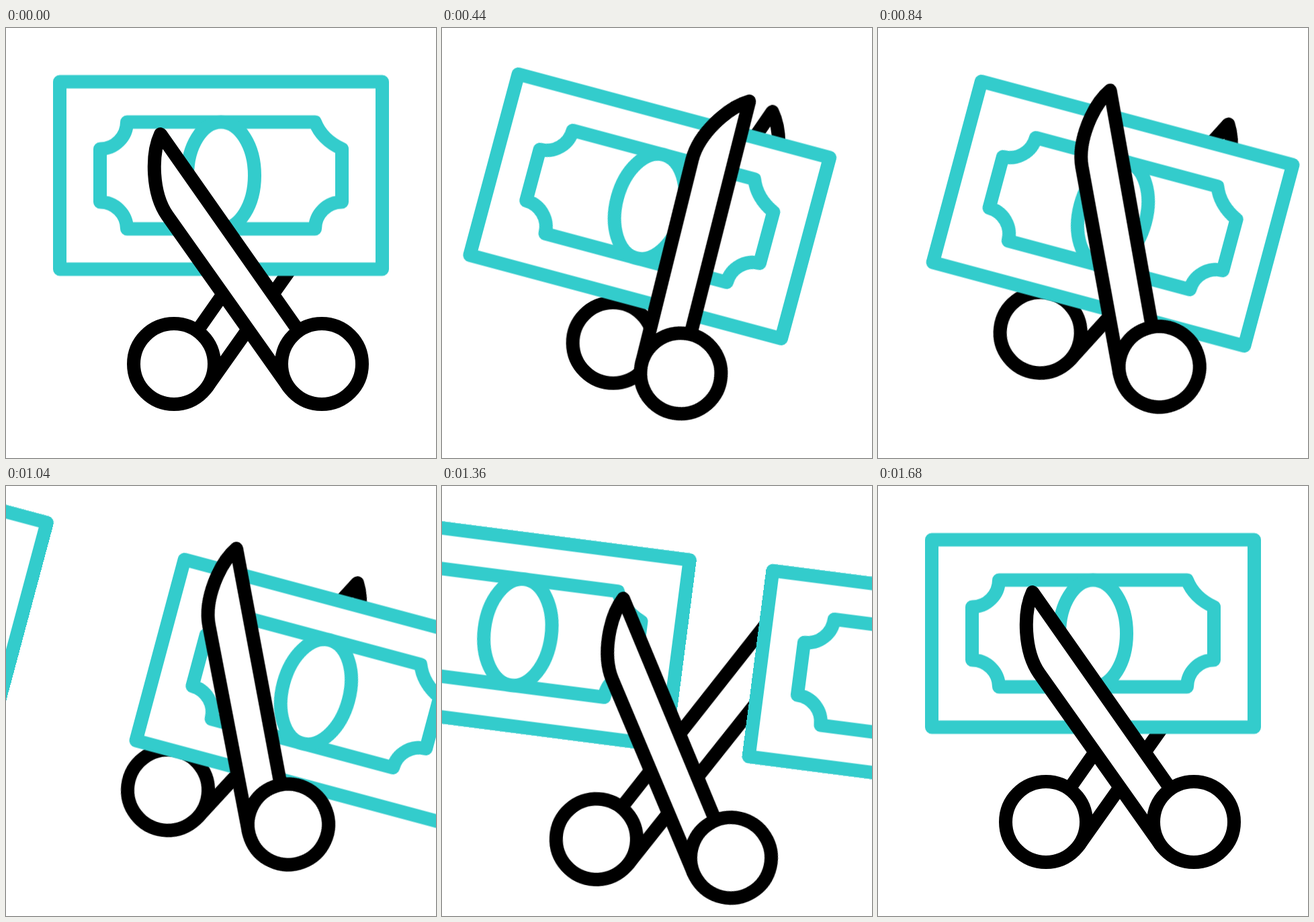
Recreate the animation shown at these times as an HTML page without scripts. Size 640 by 640 pixels, loop 2 s.

```html
<!DOCTYPE html>
<html lang="en">
<head>
<meta charset="utf-8">
<title>Scissors cutting banknotes</title>
<style>
  html, body { margin: 0; width: 100%; height: 100%; overflow: hidden; background: #fff; }
  svg { display: block; width: 100%; height: 100%; }
  .note, .arm { fill: #fff; stroke-width: 20; stroke-linejoin: round; stroke-linecap: round; }
  .note { stroke: #3cc; }
  .arm { stroke: #000; }

  .tilt, .lift, .front, .back, .leave, .enter { animation: 2s linear infinite; }
  .tilt { animation-name: tilt; }
  .lift { animation-name: lift; }
  .front { animation-name: front; }
  .back { animation-name: back; }
  .leave { animation-name: leave; }
  .enter { animation-name: enter; }

  /* Easing: (.333,0,.667,1) is a full ease; ending or starting at .5 gives its first or second half. */

  /* The whole scene leans over for the cut and straightens afterwards. */
  @keyframes tilt {
    0%, 76%, 100% { transform: translate(320px, 219.5px) rotate(0deg); }
    6% { transform: translate(320px, 219.5px) rotate(0deg); animation-timing-function: cubic-bezier(.333, 0, .667, .5); }
    14%, 68% { transform: translate(307px, 243px) rotate(7.43deg); animation-timing-function: cubic-bezier(.333, .5, .667, 1); }
    22% { transform: translate(309.25px, 265.5px) rotate(15deg); }
    60% { transform: translate(309.25px, 265.5px) rotate(15deg); animation-timing-function: cubic-bezier(.333, 0, .667, .5); }
  }
  @keyframes lift {
    0%, 76%, 100% { transform: translate(40px, 174.5px); }
    4% { transform: translate(40px, 174.5px); animation-timing-function: cubic-bezier(.333, 0, .667, .5); }
    14% { transform: translate(67.8px, 109.4px); animation-timing-function: cubic-bezier(.333, .5, .667, 1); }
    22% { transform: translate(77.5px, 78.8px); }
    56% { transform: translate(77.5px, 78.8px); animation-timing-function: cubic-bezier(.333, 0, .667, .5); }
    60% { transform: translate(75.6px, 99.3px); animation-timing-function: cubic-bezier(.333, .5, .667, 1); }
    68% { transform: translate(61.8px, 176.8px); animation-timing-function: cubic-bezier(.333, .5, .667, 1); }
  }
  @keyframes front {
    0%, 76%, 100% { transform: rotate(0deg); }
    4% { transform: rotate(0deg); animation-timing-function: cubic-bezier(.333, 0, .667, .5); }
    14% { transform: rotate(21.2deg); animation-timing-function: cubic-bezier(.333, .5, .667, 1); }
    22% { transform: rotate(34.2deg); animation-timing-function: cubic-bezier(.333, 0, .667, 1); }
    40% { transform: rotate(10.1deg); }
    60% { transform: rotate(9deg); animation-timing-function: cubic-bezier(.333, 0, .667, .5); }
    68% { transform: rotate(5.2deg); animation-timing-function: cubic-bezier(.333, .5, .667, 1); }
  }
  @keyframes back {
    0%, 76%, 100% { transform: rotate(0deg); }
    4% { transform: rotate(0deg); animation-timing-function: cubic-bezier(.333, 0, .667, .5); }
    14% { transform: rotate(-9.4deg); animation-timing-function: cubic-bezier(.333, .5, .667, 1); }
    22% { transform: rotate(-15.5deg); animation-timing-function: cubic-bezier(.333, 0, .667, 1); }
    40% { transform: rotate(-8.1deg); }
    60% { transform: rotate(-7.3deg); animation-timing-function: cubic-bezier(.333, 0, .667, .5); }
    68% { transform: rotate(-4.2deg); animation-timing-function: cubic-bezier(.333, .5, .667, 1); }
  }
  @keyframes leave {
    0% { transform: translateX(0); }
    32.75% { transform: translateX(0); animation-timing-function: cubic-bezier(.333, 0, .667, 1); }
    93.25%, 100% { transform: translateX(655px); }
  }
  @keyframes enter {
    0% { transform: translateX(-655px); }
    40% { transform: translateX(-655px); animation-timing-function: cubic-bezier(.333, 0, .667, 1); }
    84%, 100% { transform: translateX(0); }
  }
</style>
</head>
<body>
<svg viewBox="0 0 640 640">
  <defs>
    <g id="note" class="note">
      <rect x="-240" y="-139.5" width="480" height="279"/>
      <path d="M-140-79.5H140Q150-53.5 180-39.5V39.5A40 40 0 0 0 140 79.5H-140A40 40 0 0 0-180 39.5V-39.5A40 40 0 0 0-140-79.5Z"/>
      <ellipse rx="50" ry="79.5"/>
    </g>
    <!-- One arm, drawn around the scissors' pivot -->
    <g id="arm" class="arm">
      <path d="M72 52L-130-236C-144-206-143-148-120-115L61 140.6"/>
      <circle cx="110" cy="106" r="60"/>
    </g>
  </defs>
  <g class="tilt">
    <g class="lift"><g class="back"><use href="#arm" transform="scale(-1 1)"/></g></g>
    <g class="leave"><use href="#note"/></g>
    <g class="enter"><use href="#note"/></g>
    <g class="lift"><g class="front"><use href="#arm"/></g></g>
  </g>
</svg>
</body>
</html>
```
